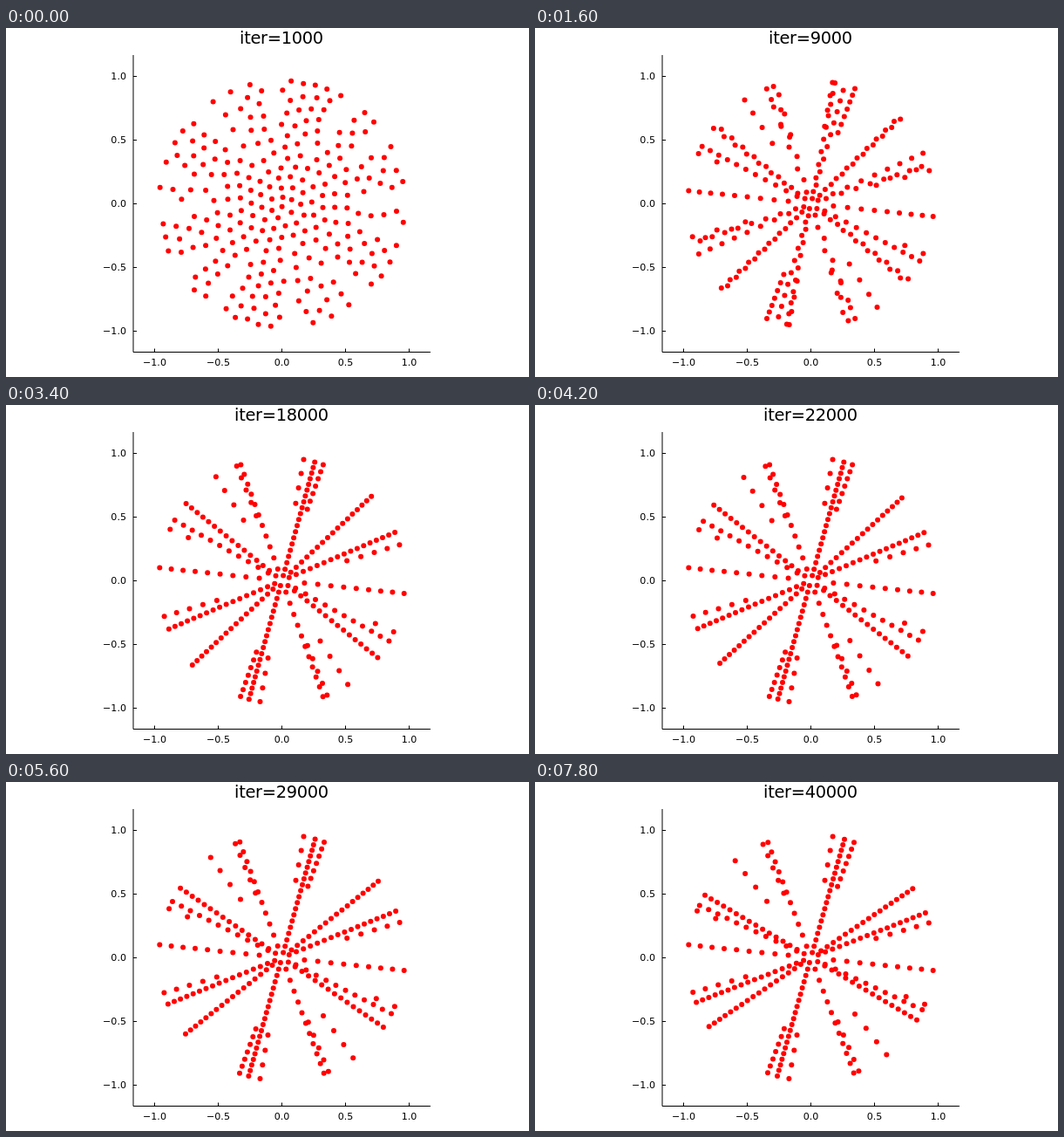
Write an HTML page that moves like this. It is 600 by 400 pixels and loops after 8 s.

```html
<!DOCTYPE html>
<html lang="en">
<head>
<meta charset="utf-8">
<title>Dots settling into rays</title>
<style>
  html, body { margin: 0; width: 100%; height: 100%; overflow: hidden; background: #fff; }
  svg { display: block; width: 600px; height: 400px; }
  text { font: 11.1px "DejaVu Sans", sans-serif; }
  #title { font-size: 19.4px; letter-spacing: -0.3px; }
</style>
</head>
<body>
<svg viewBox="0 0 600 400">
  <g id="axes" stroke="#000" fill="none"></g>
  <g id="labels"></g>
  <text id="title" x="316" y="18" text-anchor="middle"></text>
  <g id="dots" fill="#f00"></g>
</svg>
<script>
const CX = 316.5, CY = 201.3, UNIT = 146.1, RIM = 141;
const STEP = 200, STEPS = 40;
const ALIGNED = 5, MERGED = 14, TURNED = 33;

// Each spoke runs to the rim on both sides of the centre. Two loose rays, at
// angles a and b, merge at angle c; their n dots start at radius r.
const spokes = [
  { a: 73.5, b: 84, c: 74.5, r: 6, n: 20 },
  { a: 43, b: 46, c: 43.5, r: 14, n: 17 },
  { a: 25.5, b: 12.7, c: 23.2, r: 9, n: 17 },
  { a: 154.5, b: 154.5, c: 150.5, r: 18, n: 11 },
  { a: 139.5, b: 144, c: 141, r: 9, n: 16 },
  { a: 113, b: 102.5, c: 109.5, r: 14, n: 11 },
  { a: 174, b: 174, c: 174, r: 26, n: 9 },
  // short side spokes
  { a: 80, b: 80, c: 79.8, r: 90, n: 4 },
  { a: 67.3, b: 67.3, c: 70.4, r: 87, n: 7 },
  { a: 14, b: 19, c: 16.9, r: 78, n: 5 },
  { a: 157, b: 157, c: 155.3, r: 118, n: 2 },
  { a: 123, b: 123, c: 122.3, r: 82, n: 4 },
  { a: 103, b: 110, c: 111.5, r: 80, n: 5 }
];

const mix = (a, b, t) => a + (b - a) * t;
const progress = (step, from, to) => Math.min(1, Math.max(0, (step - from) / (to - from)));
const easeOut = t => 1 - (1 - t) ** 2;

// Late on, the diagonals turn towards the horizontal; other spokes hardly move.
const turn = angle => -9.5 * Math.sin(angle * Math.PI / 90) ** 5;

function rays(step) {
  const merge = easeOut(progress(step, ALIGNED, MERGED));
  const late = progress(step, MERGED, TURNED) ** 2;
  const bend = mix(0.25, 0.08, merge);
  return spokes.flatMap(({ a, b, c, r, n }) => [0, 180].flatMap(side =>
    Array.from({ length: n }, (_, i) => {
      const t = i / (n - 1);
      const radius = mix(r, RIM, t * (1 + bend * (1 - t)));
      const angle = mix(i % 2 ? b : a, c, merge) + turn(c) * late + side;
      const rad = angle * Math.PI / 180;
      return [CX + radius * Math.cos(rad), CY - radius * Math.sin(rad)];
    })));
}

// Pushes crowded dots apart until they roughly fill the disc.
function scatter(dots) {
  let seed = 7;
  const noise = () => (seed = seed * 16807 % 2147483647) / 2147483647 - 0.5;
  const out = dots.map(([x, y]) => [x + noise() * 9, y + noise() * 9]);
  const gap = 15;
  for (let pass = 0; pass < 25; pass++) {
    out.forEach((a, i) => {
      for (let j = 0; j < i; j++) {
        const b = out[j], dx = a[0] - b[0], dy = a[1] - b[1];
        const d = Math.hypot(dx, dy) || 0.01;
        if (d >= gap) continue;
        const k = (gap - d) / d * 0.2;
        a[0] += dx * k; a[1] += dy * k;
        b[0] -= dx * k; b[1] -= dy * k;
      }
    });
    for (const p of out) {
      const k = Math.min(1, RIM / Math.hypot(p[0] - CX, p[1] - CY));
      p[0] = mix(CX, p[0], k);
      p[1] = mix(CY, p[1], k);
    }
  }
  return out;
}

const scattered = scatter(rays(ALIGNED));

function positions(step) {
  const t = easeOut(progress(step, 0, ALIGNED));
  return rays(step).map(([x, y], i) => [mix(scattered[i][0], x, t), mix(scattered[i][1], y, t)]);
}

const $ = id => document.getElementById(id);
let axes = '<path d="M146 31V371.5H487"/>', labels = '';
for (let v = -1; v <= 1; v += 0.5) {
  const x = Math.floor(CX + v * UNIT) + 0.5, y = Math.floor(CY - v * UNIT) + 0.5;
  const name = v.toFixed(1).replace('-', '\u2212');
  axes += `<path d="M${x} 371.5v-4M146 ${y}h4"/>`;
  labels += `<text x="${x}" y="386.5" text-anchor="middle">${name}</text>` +
            `<text x="138" y="${y + 3.5}" text-anchor="end">${name}</text>`;
}
$('axes').innerHTML = axes;
$('labels').innerHTML = labels;

function draw(step) {
  $('title').textContent = 'iter=' + (step + 1) * 1000;
  $('dots').innerHTML = positions(step).map(([x, y]) =>
    `<circle cx="${x.toFixed(1)}" cy="${y.toFixed(1)}" r="3"/>`).join('');
}

const origin = performance.now();
let shown = -1;
function tick() {
  const step = Math.floor((performance.now() - origin) / STEP) % STEPS;
  if (step !== shown) draw(shown = step);
  requestAnimationFrame(tick);
}
tick();
</script>
</body>
</html>
```
